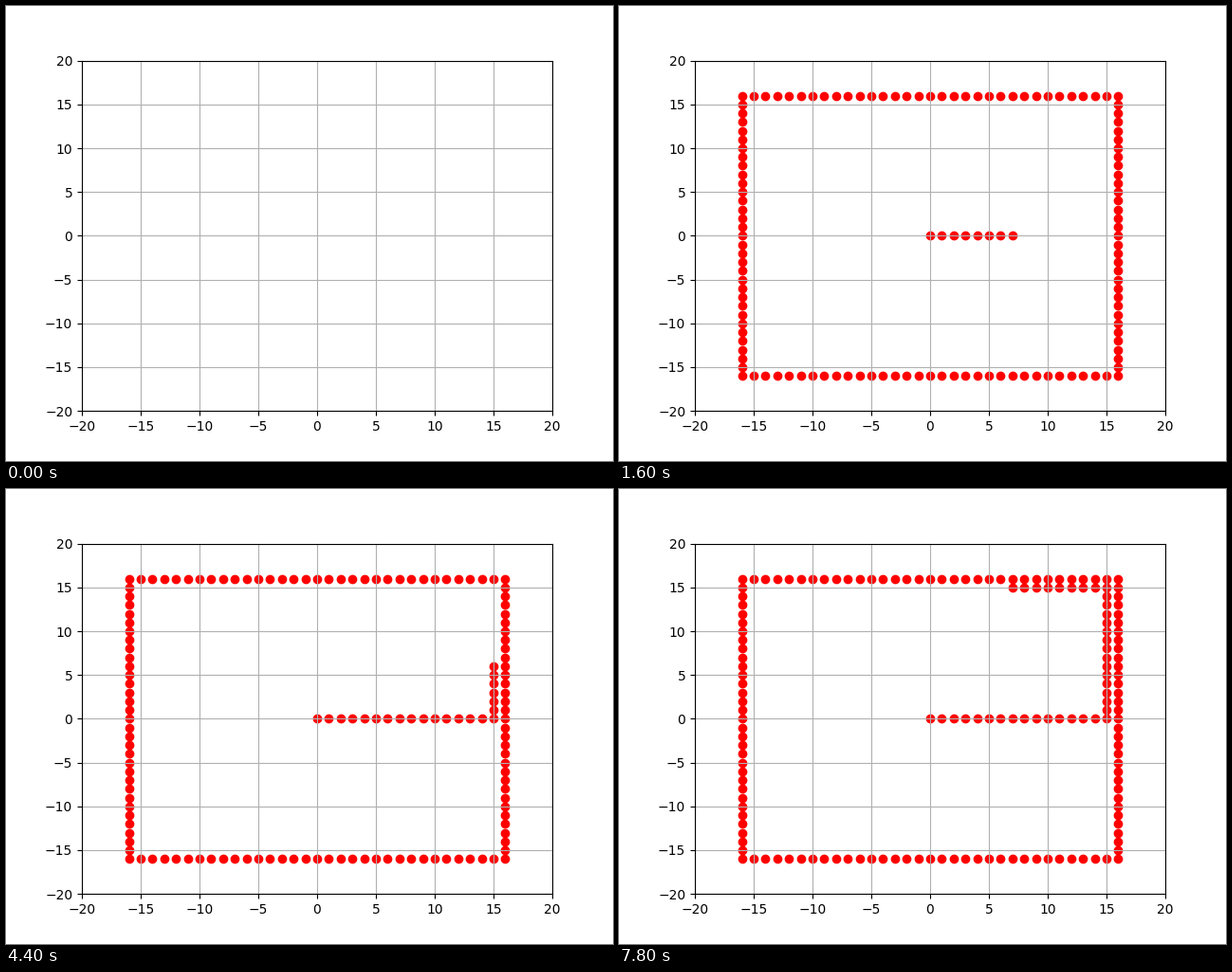
Animation, 640 px wide and 480 px high, one loop 8 s. Source, as a matplotlib script:

```python
import numpy as np
import matplotlib.pyplot as plt
from matplotlib.animation import FuncAnimation

FRAMES = 40
INTERVAL = 200
WALL = 16
TURN = WALL - 1


def make_wall():
    side = range(-WALL, WALL + 1)
    return [(x, y) for x in side for y in side if max(abs(x), abs(y)) == WALL]


def make_path(length):
    """Walk from the centre, turning left in front of each wall."""
    x, y, dx, dy = 0, 0, 1, 0
    path = [(x, y)]
    while len(path) < length:
        if max(abs(x + dx), abs(y + dy)) > TURN:
            dx, dy = -dy, dx
        x, y = x + dx, y + dy
        path.append((x, y))
    return path


wall = make_wall()
path = make_path(FRAMES)

fig, ax = plt.subplots(figsize=(6.4, 4.8), dpi=100)
ax.set_xlim(-20, 20)
ax.set_ylim(-20, 20)
ax.grid(True)
dots = ax.scatter([], [], color="red")


def update(frame):
    # The stage is empty at first, then the path grows by one dot a step.
    points = wall + path[:frame] if frame else np.empty((0, 2))
    dots.set_offsets(points)
    return (dots,)


anim = FuncAnimation(fig, update, frames=FRAMES, interval=INTERVAL,
                     repeat=True, repeat_delay=0)
plt.show()
```
